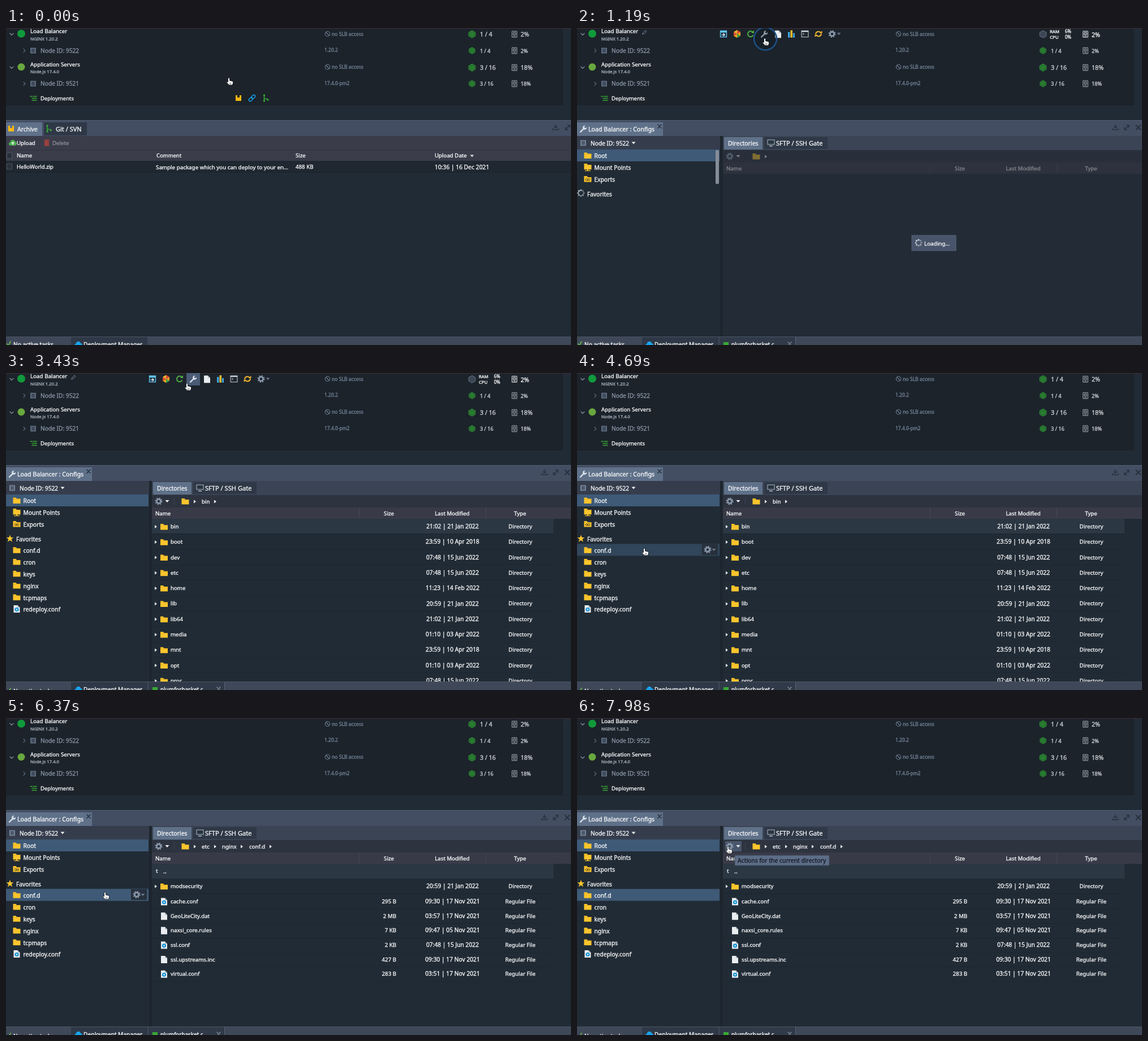
These frames come from a looping animation (999 by 561 pixels, 8000 ms). An HTML page:

```html
<!DOCTYPE html>
<html lang="en">
<head>
<meta charset="utf-8">
<title>Configuration manager</title>
<style>
html, body { margin: 0; width: 100%; height: 100%; overflow: hidden; background: #212b35; }
svg { display: block; width: 100%; height: 100%; }
text { font-family: "Noto Sans", "Open Sans", sans-serif; white-space: pre; }
</style>
</head>
<body>
<svg id="stage" viewBox="0 0 999 561" preserveAspectRatio="none"></svg>
<script>
const LOOP = 8000;
const WHITE = '#f3f4f5', GREY = '#8793a2', DIM = '#718094', GREEN = '#39a935', YELLOW = '#fbc52d', BLUE = '#18a4ee';
const TAB = '#5f7189', TAB_OFF = '#2e3846', SELECTED = '#3f5a77', INK = '#27303d';

// Drawing helpers; text is placed by its vertical centre.
const rect = (x, y, w, h, fill, extra = '') => `<rect x="${x}" y="${y}" width="${w}" height="${h}" fill="${fill}" ${extra}/>`;
const path = (d, fill = 'none', extra = '') => `<path d="${d}" fill="${fill}" ${extra}/>`;
const line = (d, color, width = 1.3) => path(d, 'none', `stroke="${color}" stroke-width="${width}" stroke-linecap="round" stroke-linejoin="round"`);
const disc = (x, y, r, fill) => `<circle cx="${x}" cy="${y}" r="${r}" fill="${fill}"/>`;
const at = (x, y, body, scale = 1) => `<g transform="translate(${x} ${y}) scale(${scale})">${body}</g>`;
const group = (id, body) => `<g id="${id}">${body}</g>`;
const text = (x, y, s, size = 9.7, fill = WHITE, anchor = 'start') =>
  `<text x="${x}" y="${y + size * .36}" font-size="${size}" fill="${fill}" stroke="${fill}" stroke-width=".35" text-anchor="${anchor}">${s}</text>`;
const mid = (x, y, s, size, fill) => text(x, y, s, size, fill, 'middle');

// Icons
const folder = (x, y, c = YELLOW) => at(x, y, path('M-6.5-5h5l1.5 2h6.5v8.5h-13z', c) + line('M-6-2.4H6', '#d9a31b', .6));
const file = (x, y, cog) => at(x, y, path('M-5.5-6.5h7l4 4v9h-11z', '#e9edf0') + path('M1.5-6.5v4h4z', '#aab4bd') +
  (cog ? disc(0, 1, 3.6, '#1593d8') + disc(0, 1, 1.2, '#fff') : ''));
const gear = (x, y, c = '#8998ab') => at(x, y, `<circle r="3.6" fill="none" stroke="${c}" stroke-width="2.6"/>` +
  `<circle r="5.6" fill="none" stroke="${c}" stroke-width="2" stroke-dasharray="2.2 2.198"/>`);
const wrench = (x, y) => at(x, y, line('M-5 5L1.5-1.5', '#dce5ef', 2.4) +
  path('M6-3.5L3.6-1.5 1.4-3.7 3.6-6C1-6.8-1.5-4.5-.6-1.5L1.6.7C4.5 1.3 6.8-.8 6-3.5z', '#dce5ef'));
const down = (x, y, c = WHITE) => path(`M${x - 3.5} ${y - 2}h7l-3.5 4z`, c);
const right = (x, y, c = WHITE) => path(`M${x - 2} ${y - 3}v6l4-3z`, c);
const cross = (x, y, r, c, w = 1.5) => line(`M${x - r} ${y - r}l${2 * r} ${2 * r}m0-${2 * r}l-${2 * r} ${2 * r}`, c, w);
const branch = (x, y) => at(x, y, line('M-3-4V5M-3 0C0 3 2 0 3 3', GREEN, 1.5) + disc(-3, -5, 1.7, GREEN) + disc(-3, 5, 1.7, GREEN) + disc(3.3, 3, 1.7, GREEN));
const box = (x, y) => at(x, y, path('M-5-5h3v4h4v-4h3V5h-10z', '#fbb90f'));
const chain = (x, y) => at(x, y, `<g fill="none" stroke="${BLUE}" stroke-width="1.4" transform="rotate(-45)">` +
  '<rect x="-7" y="-2.4" width="7.5" height="4.8" rx="2.4"/><rect x="-.5" y="-2.4" width="7.5" height="4.8" rx="2.4"/></g>');
const cloud = (x, y, c) => at(x, y, path('M-4 5C-8 5-8-.5-4.5-1-4-6 3-7 4-2 8-2 8 5 4 5z', c));
const hex = (x, y, r) => at(x, y, path('M0-6.5L5.8-3.2V3.2L0 6.5-5.8 3.2V-3.2z', '#1d5a2b', `stroke="${GREEN}" stroke-width=".9"`) +
  line('M0-4L3.4-2V2L0 4-3.4 2V-2zM0-4V4M-3.4-2L3.4 2M3.4-2L-3.4 2', '#36a03a', .8), r / 6.5);
const disk = (x, y, c) => at(x, y, `<g fill="none" stroke="${c}" stroke-width="1.2">` +
  '<rect x="-4.4" y="-5.4" width="8.8" height="10.8" rx="1"/><circle cy="-1" r="2.4"/></g>' + rect(-2.5, 2.8, 5, 1.1, c) + disc(0, -1, .8, c));
const server = (x, y, c = '#5d6b80') => rect(x - 5, y - 5, 10, 10, c) + line(`M${x - 2} ${y - 3}v6m2-6v6m2-6v6`, '#1d252d', .9);
const spinner = (x, y) => at(x, y, '<g class="spin">' + Array.from({ length: 8 }, (_, i) =>
  `<circle cx="0" cy="-5" r="1.6" fill="#dfe5eb" opacity="${.4 + i * .07}" transform="rotate(${i * 45})"/>`).join('') + '</g>');
const download = x => line(`M${x} 171v6m-2.5-2.5l2.5 2.5 2.5-2.5M${x - 5} 178v2h10v-2`, INK, 1.4);
const expand = x => line(`M${x - 4} 180l8-8m-4 0h4v4m-8 0v4h4`, INK, 1.5);
const noAccess = y => `<circle cx="568.5" cy="${y}" r="4.2" fill="none" stroke="${DIM}" stroke-width="1.1"/>` +
  line(`M565.6 ${y - 3}l6 6`, DIM, 1.1) + text(576, y, 'no SLB access', 8.6, DIM);

function usage(y, cpu, space, big) {
  const size = big ? 10.7 : 9.1;
  return hex(824, y, big ? 6.5 : 5.8) + text(838, y + .5, cpu, size, '#cbd0d6') +
    disk(899, y, '#8c929a') + text(910, y + .5, space, size, '#cbd0d6');
}

function topArea() {
  const chevron = y => line(`M7 ${y - 1.5}l3 3 3-3`, '#8190a2', 1.2);
  const node = (y, id, version) => line(`M31 ${y - 3}l3 3-3 3`, '#5b6878', 1.2) + server(48, y) +
    text(61, y, 'Node ID: ' + id, 10.2, GREY) + text(563, y - 1, version, 8.45, DIM);
  return rect(0, 0, 999, 163, '#212b36') + rect(0, 0, 985, 137, '#1c232b') + rect(0, 0, 999, 1, '#402b33') +
    chevron(11) + disc(27, 10, 7, '#119a3b') + text(43, 5.5, 'Load Balancer', 9.8) + text(43, 19, 'NGINX 1.20.2', 7.8, '#a6afba') +
    noAccess(10.5) + node(40, '9522', '1.20.2') + usage(40, '1 / 4', '2%') +
    chevron(70) + disc(27, 69, 6.5, '#69a83e') + text(43, 64, 'Application Servers', 9.75) + text(43, 77, 'Node.js 17.4.0', 7.7, '#a6afba') +
    noAccess(69) + usage(70, '3 / 16', '18%', true) + node(98.5, '9521', '17.4.0-pm2') + usage(98.5, '3 / 16', '18%') +
    line('M43 121h3m2 0h6M46 124.5h2m1 0h5M46 128h2m1 0h5', GREEN, 1.5) + text(61, 125, 'Deployments', 9.5) +
    group('balancerIdle', usage(11, '1 / 4', '2%', true)) +
    group('balancerHover', balancerTools()) +
    group('deployTools', box(411, 124) + chain(435, 124) + branch(459.5, 124));
}

function balancerTools() {
  const wheel = ['#e24a35', '#f0a020', '#45a049', '#f0a020', '#e24a35', '#e8b72f'].map((c, i) =>
    path('M0 0V-7L6-3.5z', c, `transform="rotate(${i * 60})"`)).join('');
  const halfTurn = line('M-5 0A5 5 0 0 1 4-2', '#efb52e', 2) + path('M1.5-1.5H6.5V-5.5z', '#efb52e');
  return line('M117 8l4-4 2 2-4 4-3 1z', '#77889c', 1) +
    at(259, 10.5, rect(-5.5, -5.5, 11, 11, '#213f50', 'stroke="#62c4ed" stroke-width="1.3"') + rect(-5.5, -5.5, 11, 3, '#62c4ed') + line('M-3 1.5h5m-2-2l2 2-2 2', '#fff', 1.2)) +
    at(283, 10.5, wheel) +
    at(307, 10.5, line('M4.2 2.7A5 5 0 1 1 3.5-3.5', '#4fae45', 2) + path('M1-1.5H6V-6.5z', '#4fae45')) +
    group('wrenchLit', rect(319, 0, 24, 22, '#4a5b75')) + wrench(331, 11) + file(355.5, 11) +
    rect(373, 7, 3.5, 10, '#3fa5dd') + rect(377.5, 4, 3.5, 13, '#f4bb2b') + rect(382, 9, 3, 8, '#3fa5dd') +
    rect(397, 5, 12, 11, '#20272f', 'stroke="#c9d0d8"') + rect(397, 5, 12, 2, '#c9d0d8') + line('M399.5 9l2 1.5-2 1.5', '#c9d0d8', 1) +
    at(427, 10.5, halfTurn + `<g transform="rotate(180)">${halfTurn}</g>`) +
    gear(451, 10.5) + down(463, 10.5, '#65758a') +
    at(824, 11, path('M0-6.5L5.8-3.2V3.2L0 6.5-5.8 3.2V-3.2z', '#3b4655', 'stroke="#667385"')) +
    text(836, 6.5, 'RAM', 7.8) + text(836, 16, 'CPU', 7.8) +
    text(874, 6.5, '6%', 8, WHITE, 'end') + text(874, 16, '0%', 8, WHITE, 'end') +
    disk(899, 11, '#c8cdd3') + text(910, 12, '2%', 10.7);
}

function archivePanel() {
  const check = y => rect(1.5, y - 5, 9, 10, '#28313b', 'stroke="#4d5560"');
  return rect(0, 167, 64, 24, TAB) + box(9, 178) + text(20, 179, 'Archive', 10.4) +
    rect(67, 167, 76, 23, TAB_OFF) + branch(76, 178) + text(88, 179, 'Git / SVN', 11) +
    download(972) + expand(993) +
    rect(0, 191, 999, 44, '#3b3c4a') + rect(0, 215.5, 999, 1, '#30333f') +
    cloud(12, 203, '#4caf50') + line('M12 207v-5m-2 2l2-2 2 2', '#fff', 1.1) + text(19, 204, 'Upload', 9.7) +
    rect(68, 199, 8, 10, '#98403e', 'rx="1"') + rect(67, 197.5, 10, 1.5, '#98403e') + text(82, 204, 'Delete', 9.7, '#8b8d96') +
    check(226) + text(19, 226, 'Name') + text(266, 226, 'Comment', 9.5) + text(512, 226, 'Size') + text(758, 226, 'Upload Date') + down(824, 226.5, '#d7d9dd') +
    rect(0, 235, 999, 20, '#1f2730') + check(245) + text(19, 246, 'HelloWorld.zip', 9.5) +
    text(265, 246, 'Sample package which you can deploy to your en...', 9.8) +
    text(512, 246, '488 KB', 9.7) + text(758, 246, '10:36 | 16 Dec 2021', 10.3) + rect(0, 255, 999, 1, '#1a222a');
}

function sidebar() {
  const item = (y, name, icon) => (icon || folder(19, y - 1)) + text(30.5, y, name, 10.3);
  return rect(0, 191, 253, 24, '#353d4d') + server(11, 203.5, '#76859a') + text(24, 204, 'Node ID: 9522', 10.2) + down(100, 203.5) +
    rect(0, 215, 252, 21, SELECTED) + item(226.5, 'Root') +
    item(247.5, 'Mount Points', folder(19, 245) + rect(18, 250, 2, 3, YELLOW) + rect(14, 252, 10, 1.2, YELLOW)) +
    item(268.5, 'Exports', folder(19, 267) + '<circle cx="17" cy="268.5" r="1.8" fill="none" stroke="#4e421c"/><circle cx="21" cy="268.5" r="1.8" fill="none" stroke="#4e421c"/>') +
    text(18, 294, 'Favorites', 10.3) +
    group('favLoading', spinner(7, 292) + rect(245, 216, 6, 60, '#858d97', 'rx="2"')) +
    group('favorites',
      at(7, 293, path('M0-6.5L1.8-2 6.3-2 2.7 1 4 5.7 0 3-4 5.7-2.7 1-6.3-2-1.8-2z', YELLOW)) +
      group('confHover', rect(0, 302.5, 252, 21, '#31465a')) + group('confSelected', rect(0, 302.5, 252, 21, SELECTED)) +
      group('confTools', rect(221, 303, 28, 19, '#27303c') + gear(231, 312.5) + down(242, 313, '#69798d')) +
      ['conf.d', 'cron', 'keys', 'nginx', 'tcpmaps'].map((n, i) => item(314.2 + 20.9 * i, n)).join('') +
      item(418.5, 'redeploy.conf', file(19, 417.5, true)));
}

const rootRows = [['bin', '21:02 | 21 Jan 2022'], ['boot', '23:59 | 10 Apr 2018'], ['dev', '07:48 | 15 Jun 2022'],
  ['etc', '07:48 | 15 Jun 2022'], ['home', '11:23 | 14 Feb 2022'], ['lib', '20:59 | 21 Jan 2022'], ['lib64', '21:02 | 21 Jan 2022'],
  ['media', '01:10 | 03 Apr 2022'], ['mnt', '23:59 | 10 Apr 2018'], ['opt', '01:10 | 03 Apr 2022'], ['proc', '07:48 | 15 Jun 2022']];
const confRows = [['cache.conf', '09:30 | 17 Nov 2021', '295 B'], ['GeoLiteCity.dat', '03:57 | 17 Nov 2021', '2 MB'],
  ['naxsi_core.rules', '09:47 | 05 Nov 2021', '7 KB'], ['ssl.conf', '07:48 | 15 Jun 2022', '2 KB'],
  ['ssl.upstreams.inc', '09:30 | 17 Nov 2021', '427 B'], ['virtual.conf', '03:51 | 17 Nov 2021', '283 B']];

function row(y, [name, date, size]) {
  const icon = size ? file(279.5, y + .5, name.endsWith('.conf')) : right(265, y + .5, '#e1e4e7') + folder(279.5, y + .5);
  return icon + text(291, y, name) + (size ? text(690, y, size, 9.7, WHITE, 'end') : '') +
    mid(789.5, y, date, 10.25) + mid(909.5, y, size ? 'Regular File' : 'Directory') +
    rect(258, y + 13, 710, 1, '#1d2730');
}
const crumbs = list => list.map(([x, name, arrow]) => text(x, 228, name, 9.7) + right(arrow, 227.5)).join('') +
  line('M297.5 221v12', '#3b4553', 1);

function fileManager() {
  const head = (x, s) => mid(x, 249, s);
  const firstRow = rect(258, 258, 710, 26, '#2b3743');
  return rect(258, 191, 741, 25, '#3a4455') + rect(260, 193, 68, 22, TAB) + text(267, 204, 'Directories', 10.5) +
    rect(331, 193, 112, 21, TAB_OFF) + rect(337, 198, 12, 8, '#263440', 'stroke="#b4bec9"') + rect(340, 208, 6, 1.5, '#b4bec9') +
    text(352, 204, 'SFTP / SSH Gate', 11.1) +
    rect(258, 216, 741, 23, '#2d3440') + group('gearLit', rect(262, 218, 29, 18, '#49576c')) +
    gear(270, 227) + down(285, 227) + folder(317, 227) + right(334, 227.5) +
    rect(258, 238, 741, 20, '#393a48') + rect(624, 239, 1, 18, '#444755') + rect(848, 239, 1, 18, '#444755') +
    text(264, 249, 'Name') + head(677, 'Size') + head(789, 'Last Modified') + head(909, 'Type') +
    group('rootList', firstRow + crumbs([[346, 'bin', 370]]) + rootRows.map((r, i) => row(271.5 + 27.28 * i, r)).join('')) +
    group('confList', firstRow + crumbs([[346, 'etc', 370], [382, 'nginx', 417], [430, 'conf.d', 468]]) +
      text(265, 271, 't') + text(278, 271, '..', 11) + row(297.5, ['modsecurity', '20:59 | 21 Jan 2022']) +
      confRows.map((r, i) => row(324.5 + 25.65 * i, r)).join('')) +
    group('loading', rect(258, 216, 741, 330, '#252c37', 'opacity=".57"') +
      rect(592, 367, 78, 27, '#48546a', 'stroke="#566278"') + spinner(604, 380) + text(614, 381, 'Loading...', 9.8));
}

function configPanel() {
  return rect(0, 167, 152, 24, TAB) + wrench(11, 179) + text(20, 179, 'Load Balancer : Configs', 10.65) +
    cross(146, 174, 3.2, INK) + download(952) + expand(972) + cross(992.5, 176, 4, INK, 2) +
    rect(253, 191, 5, 355, '#1d252e') + sidebar() + fileManager();
}

function taskBar() {
  return rect(0, 546, 999, 15, '#3f4858') + rect(0, 546, 999, 1, '#4b5566') +
    group('tasks', line('M2 559l2 3 4-7', '#61b74b', 1.8) + text(13, 560, 'No active tasks', 10.1)) +
    rect(115, 547, 135, 14, TAB_OFF) + cloud(128, 560, BLUE) + text(137, 560, 'Deployment Manager', 10.2) +
    group('fileTab', rect(252, 547, 134, 14, '#303a48') + rect(386, 547, 1, 14, '#596476') + rect(259, 556, 9, 5, GREEN) +
      text(273, 560, 'plumforbasket.c...', 9.9) + cross(376, 559, 3, '#8a94a1', 1.2));
}

const pointer = path('M-1.5 1Q0-1 1.5 1V5L6 6Q8 6.5 7.6 8.6L6.4 13H.5L-3.8 8.5Q-4 6.4-1.5 7.6z', '#fff', 'stroke="#15191e" stroke-width=".9"') +
  line('M1.8 9v2.5m2-2.5v2.5', '#333', .7);

document.getElementById('stage').innerHTML =
  rect(0, 0, 999, 561, '#212b35') + topArea() + rect(0, 163, 999, 28, '#434e63') + rect(0, 163, 999, 1, '#535f74') +
  group('archive', archivePanel()) + group('config', configPanel()) + taskBar() +
  group('tooltip', rect(279, 243, 167, 18, '#5d6d87', 'stroke="#3b485b"') + text(284, 252.5, 'Actions for the current directory', 10.4, '#161d26')) +
  '<circle id="ring" cx="333" cy="19" fill="#0d1720" fill-opacity=".35" stroke="#1c5288" stroke-width="2.5"/>' +
  group('cursor', pointer);

const ui = Object.fromEntries([...document.querySelectorAll('#stage [id]')].map(el => [el.id, el]));
const spinners = document.querySelectorAll('.spin');
const show = (id, on) => ui[id].setAttribute('display', on ? 'inline' : 'none');

// Cursor stops: time, x, y
const stops = [[0, 394, 88], [800, 332, 18], [3200, 332, 18], [3430, 320, 18], [4600, 119, 310],
  [5850, 119, 310], [6300, 175, 308], [6750, 175, 308], [7500, 267, 227], [LOOP, 267, 227]];

function cursorAt(t) {
  const i = stops.findIndex(s => s[0] > t);
  const [t0, x0, y0] = stops[i - 1], [t1, x1, y1] = stops[i];
  const p = (t - t0) / (t1 - t0), e = p * p * (3 - 2 * p);
  return [x0 + (x1 - x0) * e, y0 + (y1 - y0) * e];
}

function draw(now) {
  const t = Math.floor((now % LOOP) / 70) * 70;
  const [x, y] = cursorAt(t);
  const onBalancer = y < 28, onConf = x < 252 && y > 303 && y < 323;
  const opened = t >= 1120, selected = t >= 5740, swapped = t >= 5950;
  const busy = t < 2870 || (selected && !swapped);
  ui.cursor.setAttribute('transform', `translate(${x} ${y})`);
  show('balancerHover', onBalancer);
  show('balancerIdle', !onBalancer);
  show('deployTools', t < 140);
  show('archive', !opened);
  show('config', opened);
  show('fileTab', opened);
  show('wrenchLit', t >= 1330);
  show('favLoading', t < 1680);
  show('favorites', t >= 1680);
  show('confHover', onConf);
  show('confSelected', selected);
  show('confTools', onConf);
  show('rootList', t >= 2870 && !swapped);
  show('confList', swapped);
  show('loading', busy);
  show('gearLit', x > 262 && x < 291 && y > 218 && y < 240);
  show('tooltip', t >= 7700);
  show('ring', t >= 1050 && t < 1330);
  ui.ring.setAttribute('r', 10 + Math.max(0, t - 1050) / 14);
  ui.tasks.setAttribute('transform', `translate(0 ${t >= 1680 ? 3 : 0})`);
  spinners.forEach(s => s.setAttribute('transform', `rotate(${Math.floor(t / 70) * 45})`));
}

const start = performance.now();
function tick(now) {
  draw(Math.max(0, now - start));
  requestAnimationFrame(tick);
}
draw(0);
requestAnimationFrame(tick);
</script>
</body>
</html>
```
